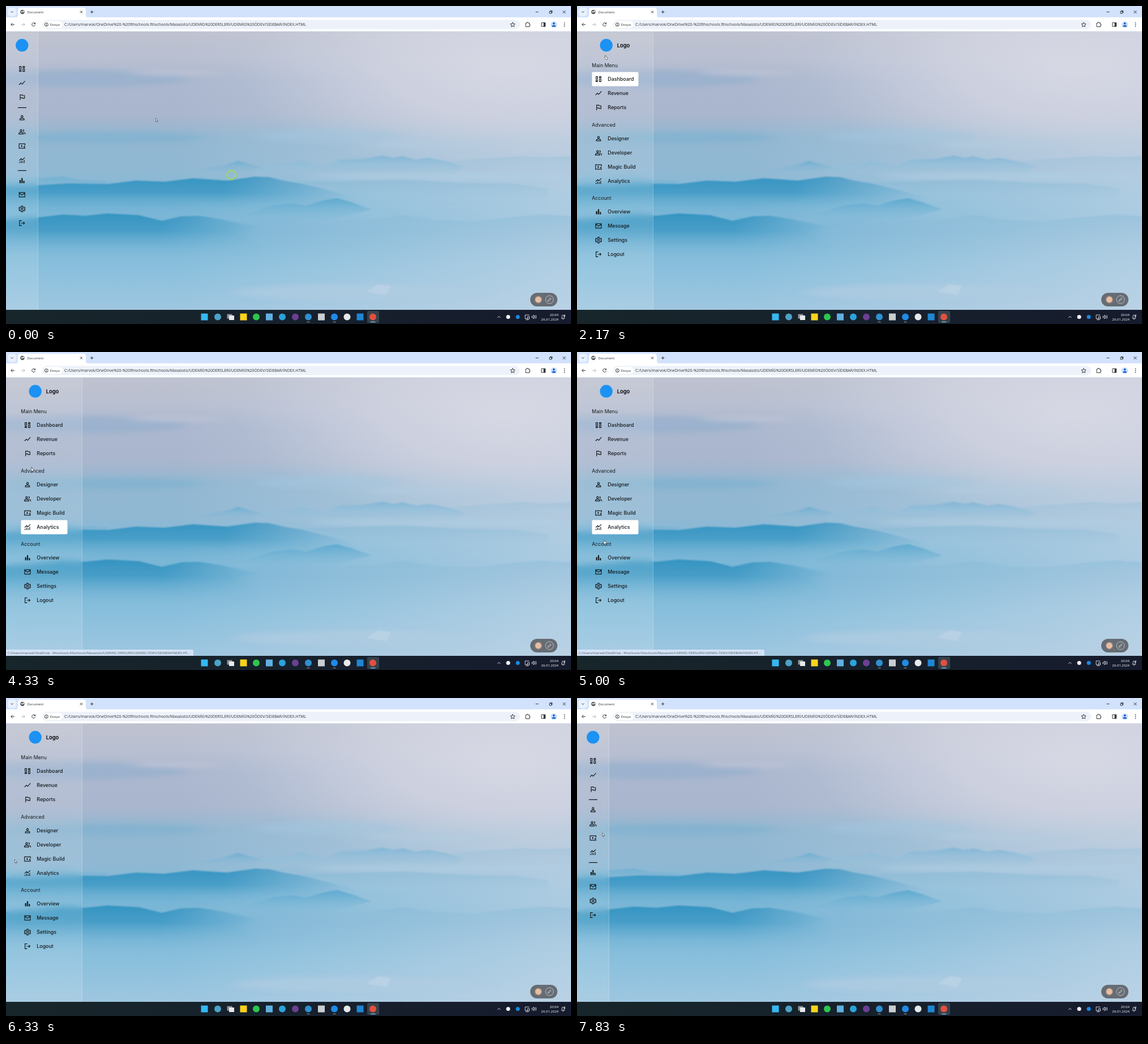
Recreate the animation shown at these times as an HTML page. Size 998 px wide and 561 px high, loop 8000 ms.

```html
<!DOCTYPE html>
<html lang="tr">
<head>
<meta charset="utf-8">
<title>Document</title>
<style>
  html, body { margin: 0; width: 100%; height: 100%; overflow: hidden; }
  #stage { position: relative; width: 998px; height: 561px; overflow: hidden; }
  #stage > svg { position: absolute; left: 0; top: 0; }
  #sidebar {
    position: absolute; left: 0; top: 44px; height: 492px; overflow: hidden; box-sizing: border-box;
    background: rgba(255, 255, 255, .12); border-right: 1px solid rgba(255, 255, 255, .2);
    -webkit-backdrop-filter: blur(6px); backdrop-filter: blur(6px);
  }
  #sidebar svg { position: absolute; top: 0; }
  #sidebar text { font: 500 8.85px Inter, sans-serif; fill: #161a1d; }
  #sidebar .heading { font-weight: 400; font-size: 8.7px; }
  #sidebar .brand { font-weight: 600; font-size: 9.4px; fill: #000; }
  .ui { font-family: "Open Sans", sans-serif; }
  .line { fill: none; stroke: #33373c; stroke-width: 1; }
  .tray { fill: none; stroke: #fff; stroke-width: .8; }
</style>
</head>
<body>
<div id="stage">
  <svg width="998" height="561" viewBox="0 0 998 561">
    <defs>
      <linearGradient id="sky" x2="0" y2="1">
        <stop stop-color="#bfc2cf"/><stop offset=".1" stop-color="#b8bfd1"/>
        <stop offset=".18" stop-color="#acb8cf"/><stop offset=".3" stop-color="#a9b6cd"/>
        <stop offset=".38" stop-color="#92b7d1"/><stop offset=".5" stop-color="#90b8d3"/>
        <stop offset=".6" stop-color="#82bad8"/><stop offset=".72" stop-color="#76b4d5"/>
        <stop offset=".84" stop-color="#88bfdc"/><stop offset="1" stop-color="#9ec6e0"/>
      </linearGradient>
      <linearGradient id="haze">
        <stop offset=".3" stop-color="#cfdae8" stop-opacity="0"/>
        <stop offset="1" stop-color="#cfdae8" stop-opacity=".58"/>
      </linearGradient>
      <radialGradient id="glow">
        <stop stop-color="#dadae5" stop-opacity=".85"/><stop offset=".45" stop-color="#d6d6e2" stop-opacity=".65"/>
        <stop offset="1" stop-color="#d0d2df" stop-opacity="0"/>
      </radialGradient>
      <linearGradient id="deep" x2="0" y2="1">
        <stop stop-color="#3493c1"/><stop offset=".4" stop-color="#429bc6" stop-opacity=".9"/>
        <stop offset="1" stop-color="#74b4d6" stop-opacity="0"/>
      </linearGradient>
      <linearGradient id="mid" x2="0" y2="1">
        <stop stop-color="#5ea9cf"/><stop offset="1" stop-color="#82bbd8" stop-opacity="0"/>
      </linearGradient>
      <linearGradient id="far" x2="0" y2="1">
        <stop stop-color="#82b7d6"/><stop offset="1" stop-color="#a5c8df" stop-opacity="0"/>
      </linearGradient>
      <linearGradient id="fade"><stop offset=".6" stop-color="#fff"/><stop offset=".98"/></linearGradient>
      <mask id="taper" maskContentUnits="objectBoundingBox"><rect width="1" height="1" fill="url(#fade)"/></mask>
      <filter id="soft"><feGaussianBlur stdDeviation=".9"/></filter>
      <filter id="mist" x="-30%" y="-150%" width="160%" height="400%"><feGaussianBlur stdDeviation="14 4"/></filter>
      <linearGradient id="bar"><stop stop-color="#17262a"/><stop offset="1" stop-color="#161b2d"/></linearGradient>
    </defs>
    <rect y="44" width="998" height="492" fill="url(#sky)"/>
    <rect y="44" width="998" height="492" fill="url(#haze)"/>
    <ellipse cx="880" cy="110" rx="470" ry="190" fill="url(#glow)"/>
    <g filter="url(#mist)">
      <ellipse cx="130" cy="128" rx="190" ry="15" fill="#94afcd" opacity=".7"/>
      <ellipse cx="300" cy="118" rx="80" ry="4" fill="#bcc3d5"/>
      <ellipse cx="180" cy="232" rx="170" ry="10" fill="#78b0d0" opacity=".5"/>
      <ellipse cx="570" cy="230" rx="130" ry="12" fill="#a3c5de" opacity=".5"/>
      <ellipse cx="760" cy="245" rx="120" ry="6" fill="#b3cbe0" opacity=".6"/>
      <ellipse cx="760" cy="300" rx="230" ry="8" fill="#b3cfe3" opacity=".6"/>
      <ellipse cx="420" cy="350" rx="110" ry="8" fill="#8fc1dc" opacity=".4"/>
      <ellipse cx="620" cy="505" rx="220" ry="14" fill="#b0cce2" opacity=".7"/>
    </g>
    <g filter="url(#soft)">
      <path fill="url(#far)" opacity=".3" d="M780 276L830 270 870 268 910 265 950 267 998 265V300H780z"/>
      <path fill="url(#mid)" opacity=".7" d="M340 289L390 280 410 273 430 279 455 285 500 295H340z"/>
      <path fill="url(#far)" d="M440 287L480 277 497 280 520 273 545 279 565 283 590 271 630 270 665 264 685 268 700 265 725 271 745 268 775 273 810 283 780 302H440z"/>
      <path fill="url(#far)" opacity=".45" d="M500 312L600 309 700 306 800 312 900 314 958 322V350H560z"/>
      <path fill="url(#mid)" opacity=".55" d="M0 305L57 304 100 301 130 307 180 309V330H0z"/>
      <path fill="url(#deep)" mask="url(#taper)" d="M0 317L57 316 110 313 180 314 230 308 280 310 330 304 390 308 440 301 465 302 490 308 520 313 550 320 600 333 640 345V373H0z"/>
      <path fill="url(#mid)" d="M420 368L470 352 505 348 530 352 560 343 585 339 610 346 645 359 580 375 470 382z"/>
      <path fill="url(#far)" opacity=".4" d="M400 397L500 385 560 380 640 378 700 369 760 378 830 380 900 372 950 368 998 371V430H460z"/>
      <path fill="url(#deep)" mask="url(#taper)" d="M0 377L57 373 100 368 140 370 180 366 235 369 275 379 310 371 340 370 380 376 460 394V440H0z"/>
      <path fill="#bdd2e5" opacity=".8" d="M636 504L658 491 680 494 672 510z"/>
    </g>
  </svg>

  <div id="sidebar"></div>

  <svg class="ui" width="998" height="561" viewBox="0 0 998 561">
    <rect width="998" height="45" fill="#d2e2fc"/>
    <rect y="20" width="998" height="24.5" fill="#fff"/>
    <rect x="3" y="3" width="15" height="15" rx="5" fill="#e9f1fe"/>
    <path d="M16 20.500q5 0 5-5V8q0-5 5-5h110q5 0 5 5v7.500q0 5 5 5z" fill="#fff"/>
    <path class="line" d="M8.500 9.500l2 2 2-2M131 8.500l4 4m0-4l-4 4M149 10.500h5.400M151.700 7.800v5.400M935.500 10.500h5M983.500 8l5 5m0-5l-5 5"/>
    <path class="line" d="M960 9.500h3.500v3.500H960zM961.300 9.500V8.300h3.400v3.600h-1.200" stroke-width=".8"/>
    <circle cx="29" cy="10.500" r="3.700" fill="#53585e"/>
    <path d="M26.500 9q2-.5 2.500 1t-1 2zM30 7.800l2 1.500-1 2.200-1.500-1.500z" fill="#fff"/>
    <text x="37.500" y="12.700" font-size="5.900" fill="#2c3035">Document</text>
    <path class="line" d="M15 32.700H8.800m2.800-2.800l-2.800 2.800 2.800 2.800M51.300 31a3 3 0 1 0 .3 2.500M51.600 29.200v2.200h-2.300"/>
    <path class="line" style="stroke:#b4b8bd" d="M27 32.700h6.200m-2.800-2.800l2.800 2.800-2.800 2.800"/>
    <rect x="64" y="24.500" width="844" height="16.500" rx="8.250" fill="#edf2fa"/>
    <rect x="66" y="26.500" width="34" height="12.500" rx="6.250" fill="#fff"/>
    <circle class="line" cx="71.300" cy="32.700" r="3" stroke-width=".8"/>
    <path class="line" d="M71.300 32.200v2.200M71.300 30.700v.8"/>
    <text x="77.500" y="35" font-size="6.100" fill="#2c3035">Dosya</text>
    <text x="103" y="35.200" font-size="6.920" fill="#303438">C:/Users/marvok/OneDrive%20-%20fthschools.fthschools/Masaüstü/UDEMİG%20DERSLERİ/UDEMİG%20ÖDEV/SİDEBAR/İNDEX.HTML</text>
    <path class="line" stroke-width=".8" d="M895 28.800l1.200 2.500 2.800.4-2 2 .5 2.800-2.500-1.300-2.500 1.300.5-2.800-2-2 2.800-.4z"/>
    <path class="line" d="M918 30h2.300v-1.200h2V30h2.300v2.300h1v2h-1v2.300H918z"/>
    <path class="line" d="M945.800 29.500h6.800v6.500h-6.800z"/><path fill="#33373c" d="M949.500 29h3.500v7.500h-3.500z"/>
    <circle cx="967.700" cy="32.700" r="5.700" fill="#c9defc"/>
    <path d="M967.700 29a1.800 1.800 0 1 1-.01 0zM964.300 36.500q0-2.700 3.400-2.700t3.400 2.700z" fill="#0b57d0"/>
    <path d="M986.500 29v8" stroke="#33373c" stroke-width="1.500" stroke-dasharray="1.500 1.500"/>

    <g id="status">
      <path d="M0 525h328q3 0 3 3v8.500H0z" fill="#d3e3f7"/>
      <text x="2.800" y="532.800" font-size="5.930" fill="#51575e">C:/Users/marvok/OneDrive - fthschools.fthschools/Masaüstü/UDEMİG DERSLERİ/UDEMİG ÖDEV/SİDEBAR/İNDEX.HT...</text>
    </g>

    <rect x="926" y="506" width="48" height="24" rx="12" fill="#666c74"/>
    <circle cx="940.300" cy="518" r="6.200" fill="#e3bea6" stroke="#8c7c74" stroke-width="1.500"/>
    <circle cx="960" cy="518" r="7" fill="none" stroke="#c4c8cc" stroke-width=".9"/>
    <path d="M957.200 520.800l.6-2 3.800-3.800 1.400 1.400-3.800 3.800z" fill="none" stroke="#e2e4e6" stroke-width=".8"/>

    <rect y="536" width="998" height="25" fill="url(#bar)"/>
    <rect x="638" y="538" width="21" height="21" rx="2" fill="#35414b"/>
    <g id="apps"></g>
    <path d="M390.500 543.500h9v8h-9z" fill="#8b9298"/><path d="M394 546h9v8h-9z" fill="#e7e9eb"/>
    <path d="M531.500 557.500h5M577.500 557.500h5" stroke="#9aa2a8"/><path d="M644 557.500h8.500" stroke="#7cc4f5" stroke-width="1.300"/>
    <path class="tray" d="M868 550l2.700-2.700 2.700 2.700M924 545.500v-.5h-7v6.500h4M918 553.500h5M921.500 548h3v4h-3z"/>
    <circle cx="887" cy="548.500" r="3.500" fill="#f0f2f4"/><circle cx="904" cy="548.500" r="3.500" fill="#198ae0"/>
    <path class="tray" d="M929 547.200h1.500l2-2v6.600l-2-2H929zM934 546.700q1.300 1.800 0 3.600M935.600 545.300q2.300 3.200 0 6.400"/>
    <path class="tray" d="M981 551h6l-1-1.500v-2q-.2-2-2-2.200t-2 2.200v2zM983 552.500h2M985.500 545h2.500l-2.500 2.500h2.500"/>
    <g fill="#fff" text-anchor="end"><text x="976" y="547" font-size="6.100">20:04</text><text x="976" y="555" font-size="6">26.01.2024</text></g>

    <g id="spinner" fill="none" stroke="#9fd07a">
      <circle cx="398" cy="298" r="7.800" stroke-width="3.200" stroke-opacity=".6"/>
      <circle cx="398" cy="298" r="7.800" stroke-width="2.600" stroke-dasharray="3.080 1"/>
    </g>
    <g id="cursor" fill="#fff" stroke="#222" stroke-width=".6" stroke-linejoin="round">
      <path id="arrow" d="M0 0V5.800L1.300 4.600 2.200 6.500 3.100 6.100 2.300 4.200H4.100z"/>
      <path id="hand" d="M.8 0q.8 0 .8.800V3l2.200.6q.7.200.6 1L4 7H1.500L-.8 4.500q0-.8.800-.5V.8Q0 0 .8 0z"/>
    </g>
  </svg>
</div>

<script>
const $ = id => document.getElementById(id);
const LOOP = 8, FPS = 6, TOP = 44, CLOSED = 57, OPEN = 135;
const CURSOR_LAG = .5;

// label, open y, closed y, icon on a 24 unit grid
const items = [
  ["Dashboard", 129, 111, "M4 4h5v8H4zM15 4h5v4h-5zM15 12h5v8h-5zM4 16h5v4H4z"],
  ["Revenue", 154, 136, "M2.500 17.500l6-6 4 4 9-10"],
  ["Reports", 179, 161, "M6 21V4.500h7l.5 2H20v9h-6l-.5-2H6"],
  ["Designer", 234, 197, "M12 5a3 3 0 1 0 .01 0zM5 19v-1.500c0-2.500 4-4 7-4s7 1.500 7 4V19z"],
  ["Developer", 259, 222, "M9 5a3 3 0 1 0 .01 0zM2 19v-1.500c0-2.500 4-4 7-4s7 1.500 7 4V19zM15 5a3 3 0 0 1 0 6M18 14c2 .7 4 1.800 4 3.500V20"],
  ["Magic Build", 284, 247, "M21.500 10V5h-19v14h19v-2M8 12h6M11 9v6M17 14h5M19.500 11.500v5"],
  ["Analytics", 309, 272, "M4 21v-4M9 21v-8M14 21v-6M19 21V11M3 13l6-6 4 4 8-8"],
  ["Overview", 363, 308, "M6 20V10M12 20V4M18 20v-7"],
  ["Message", 388, 333, "M3 5h18v14H3zM3 6.500l9 6.500 9-6.500"],
  ["Settings", 413, 358, "M12 9a3 3 0 1 0 .01 0zM10 2.800h4l.6 3L17 7.200l2.800-1 2 3.500-2.200 2v.6l2.200 2-2 3.500-2.800-1-2.400 1.400-.6 3h-4l-.6-3L7 16.800l-2.800 1-2-3.500 2.200-2v-.6l-2.200-2 2-3.500 2.800 1 2.400-1.400z"],
  ["Logout", 438, 383, "M11 4H4v16h7M9 12h11M16 8l4 4-4 4"]
];
const headings = [["Main Menu", 105], ["Advanced", 209.5], ["Account", 339]];

const icon = ([label, , , path], x, y) =>
  `<path d="${path}" transform="translate(${x} ${y}) scale(.55) translate(-12 -12)" fill="none" stroke="#161a1d" stroke-width="${label === "Overview" ? 4 : 2.1}"/>`;
const badge = x => `<circle cx="${x}" cy="69.300" r="11.200" fill="#1b92f4"/>`;
const panel = (id, width, body) =>
  `<svg id="${id}" width="${width}" height="492" viewBox="0 ${TOP} ${width} 492">${body}</svg>`;

$("sidebar").innerHTML =
  panel("openPanel", OPEN,
    badge(51.7) + `<text class="brand" x="70.700" y="72.700">Logo</text>` +
    `<rect id="highlight" x="26.500" width="82" height="25" rx="2" fill="#fff"/>` +
    headings.map(([text, y]) => `<text class="heading" x="26.300" y="${y + 3.1}">${text}</text>`).join("") +
    items.map(it => icon(it, 38, it[1]) + `<text x="54.300" y="${it[1] + 3.2}">${it[0]}</text>`).join("")) +
  panel("closedPanel", CLOSED,
    badge(28.3) + `<path d="M21 179.300h15M21 290.300h15" stroke="#161a1d" stroke-width="1.200"/>` +
    items.map(it => icon(it, 28.3, it[2])).join(""));

const dot = (x, color) => `<circle cx="${x}" cy="548.500" r="6" fill="${color}"/>`;
const tile = (x, color) => `<rect x="${x - 6}" y="542.500" width="12" height="12" fill="${color}"/>`;
$("apps").innerHTML = tile(350.5, "#35b8f1") + dot(374, "#4aa3c7") + tile(419.5, "#fbd31c") + dot(442, "#2cc64f") +
  tile(465, "#5fb0e0") + dot(488, "#2ba3dc") + dot(511, "#6b3f92") + dot(534, "#2f8fd0") + tile(557, "#c9cdd0") +
  dot(580, "#1f8be8") + dot(602.5, "#e6e8ea") + tile(625.5, "#1f86d2") + dot(648, "#e2503f");

// time, x, y of the pointer as the page sees it
const route = [
  [0, 266, 201], [.6, 266, 201], [1.35, 58, 96], [1.667, 51, 90], [2.167, 47, 127], [2.833, 44.5, 131.5],
  [3.333, 45, 180], [3.833, 46, 206], [4.333, 46, 309], [4.7, 52, 365], [5.167, 134, 294], [5.45, 150, 291],
  [5.833, 17, 288], [6.4, 8, 275], [7, 20, 255], [7.333, 46, 241], [7.45, 136, 235], [8, 200, 220]
];
const toggles = [[-9, 0], [1.36, 1], [5.47, 0], [5.8, 1], [7.4, 0]];

function pointerAt(t) {
  t = Math.max(0, t);
  const i = Math.max(1, route.findIndex(p => p[0] >= t));
  const [a, b] = [route[i - 1], route[i]];
  const k = (t - a[0]) / (b[0] - a[0]);
  return [a[1] + (b[1] - a[1]) * k, a[2] + (b[2] - a[2]) * k];
}

function show(id, visible) { $(id).style.display = visible ? "" : "none"; }

function render(t) {
  const [start, open] = toggles.filter(s => s[0] <= t).pop();
  const eased = 1 - Math.pow(1 - Math.min(1, (t - start) / .4), 2.2);
  const width = CLOSED + (OPEN - CLOSED) * (open ? eased : 1 - eased);
  $("sidebar").style.width = width + "px";
  show("openPanel", open);
  show("closedPanel", !open);
  $("openPanel").style.left = (width - OPEN) / 2 + "px";
  $("closedPanel").style.left = (width - CLOSED) / 2 + "px";

  const [hx, hy] = pointerAt(t);
  const hovered = open && hx > 26 && hx < 109 && items.find(it => Math.abs(it[1] - hy) <= 12.5);
  show("highlight", hovered);
  if (hovered) $("highlight").setAttribute("y", hovered[1] - 12.5);

  const [x, y] = pointerAt(t - CURSOR_LAG);
  $("cursor").setAttribute("transform", `translate(${x - 1.5} ${y - 3})`);
  show("hand", hovered);
  show("arrow", !hovered);
  show("status", t >= 2.3 && t < 5.8);
  show("spinner", t < .3);
  $("spinner").setAttribute("transform", `rotate(${t * 180} 398 298)`);
}

function frame() {
  const t = performance.now() / 1000 % LOOP;
  render(Math.floor((t + .004) * FPS) / FPS % LOOP);
  requestAnimationFrame(frame);
}
frame();
</script>
</body>
</html>
```
